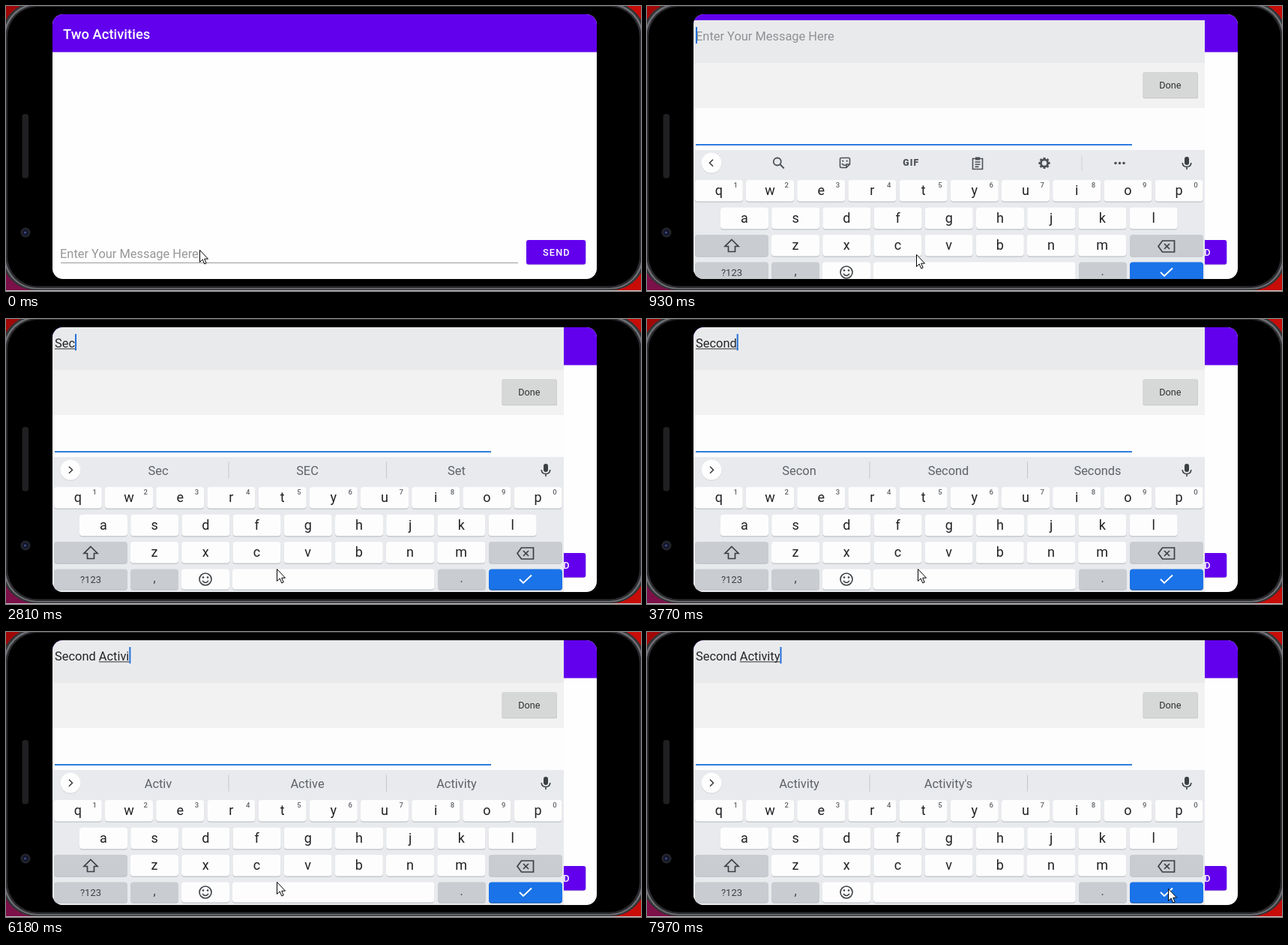
An HTML page with a canvas that plays this animation: 847 px wide and 380 px high, repeating every 8 s.

```html
<!DOCTYPE html>
<html lang="en">
<head>
<meta charset="utf-8">
<title>Typing a message</title>
<style>
html, body { margin: 0; width: 100%; height: 100%; overflow: hidden; background: #000; }
canvas { display: block; }
</style>
</head>
<body>
<canvas id="stage" width="847" height="380"></canvas>
<script>
const ctx = document.getElementById('stage').getContext('2d');
const LOOP = 8000, PURPLE = '#6200ee', BLUE = '#1a73e8', ICON = '#4d5156';
const WHITE = '#fdfdfd', GRAY_KEY = '#c9ccd1', BOARD = '#e8eaed';
const BODY = 16.42;

// time, x, y of the pointer tip
const pointer = [
  [0, 258, 325], [150, 261, 325], [280, 270, 326], [410, 288, 327], [540, 312, 328],
  [660, 336, 329], [800, 352, 330], [930, 359, 331], [1050, 361, 333],
  [7150, 372, 340], [7290, 420, 352], [7420, 490, 362], [7560, 570, 366],
  [7690, 640, 360], [7830, 685, 348], [7970, 695, 342]
];
// time, panel offset, panel opacity
const slide = [[0, 0, 0], [800, 20, 0.6], [930, 8, 1], [1050, 0, 1]];
// time, text, end of the underline, caret shown, suggestions
const typing = [
  [0, '', 0, 1, ''], [1180, '', 0, 0, ''], [1710, '', 0, 1, ''],
  [2140, 'S', 0, 1, ''], [2280, 'S', 1, 1, 'S|So|See'],
  [2420, 'Se', 2, 1, 'S|So|See'], [2560, 'Se', 2, 1, 'Se|See|Set'],
  [2680, 'Sec', 3, 1, 'Se|See|Set'], [2810, 'Sec', 3, 1, 'Sec|SEC|Set'],
  [3110, 'Seco', 4, 1, 'Sec|SEC|Set'], [3260, 'Seco', 4, 1, 'Seco|Second|Seconds'],
  [3400, 'Secon', 5, 1, 'Seco|Second|Seconds'], [3540, 'Secon', 5, 1, 'Secon|Second|Seconds'],
  [3720, 'Second', 6, 1, 'Secon|Second|Seconds'], [3860, 'Second', 6, 1, 'Second|Seconds|Secondary'],
  [4120, 'Second ', 0, 1, 'Second|Seconds|Secondary'], [4260, 'Second ', 0, 1, 'time|one|day'],
  [4630, 'Second ', 0, 0, 'time|one|day'], [4760, 'Second A', 0, 1, 'time|one|day'],
  [5020, 'Second A', 8, 1, 'A|And|At'], [5150, 'Second Ac', 9, 1, 'A|And|At'],
  [5300, 'Second Ac', 9, 1, 'Ac|Act|Account'], [5480, 'Second Act', 10, 1, 'Ac|Act|Account'],
  [5630, 'Second Act', 10, 1, 'Act|Acts|Action'], [5780, 'Second Acti', 11, 1, 'Act|Acts|Action'],
  [5920, 'Second Acti', 11, 1, 'Acti|Action|Active'], [6050, 'Second Activ', 12, 1, 'Acti|Action|Active'],
  [6180, 'Second Activi', 13, 1, 'Activ|Active|Activity'],
  [6320, 'Second Activi', 13, 1, 'Activi|Activity|Activities'],
  [6450, 'Second Activit', 14, 1, 'Activi|Activity|Activities'],
  [6580, 'Second Activit', 14, 1, 'Activit|Activity|Activities'],
  [6720, 'Second Activity', 14, 1, 'Activit|Activity|Activities'],
  [6870, 'Second Activity', 15, 1, "Activity|Activity's|"],
  [7290, 'Second Activity', 15, 0, "Activity|Activity's|"],
  [7830, 'Second Activity', 15, 1, "Activity|Activity's|"]
];

const at = (steps, t) => steps.filter(s => s[0] <= t).pop();

function rect(x, y, w, h, color) {
  ctx.fillStyle = color;
  ctx.fillRect(x, y, w, h);
}
function round(x, y, w, h, r, color) {
  ctx.fillStyle = color;
  ctx.beginPath();
  ctx.roundRect(x, y, w, h, r);
  ctx.fill();
}
function disc(x, y, r, color) {
  ctx.fillStyle = color;
  ctx.beginPath();
  ctx.arc(x, y, r, 0, 7);
  ctx.fill();
}
function text(str, x, y, size, color, align = 'left', weight = 400, spacing = 0) {
  ctx.font = `${weight} ${size}px Roboto, sans-serif`;
  ctx.letterSpacing = spacing + 'px';
  ctx.textAlign = align;
  ctx.fillStyle = color;
  ctx.fillText(str, x, y);
}
// stroke an SVG path around the point x, y
function line(x, y, d, color = ICON, width = 1.6) {
  ctx.save();
  ctx.translate(x, y);
  ctx.strokeStyle = color;
  ctx.lineWidth = width;
  ctx.stroke(new Path2D(d));
  ctx.restore();
}

function drawPhone() {
  rect(0, 0, 424, 190, '#a00808');
  rect(424, 0, 423, 380, '#c80c08');
  rect(0, 190, 424, 190, '#7c1048');
  // the rim runs slightly past the stage
  round(-6, -5, 859, 384, 46, '#333437');
  round(-3, -3, 853, 380.5, 44, '#707175');
  round(-0.5, -1, 848, 377, 42, '#2b2c2f');
  round(2, 1, 843, 372.5, 40, '#000');
  rect(0, 379, 847, 1, '#c8c8c8');
  round(21.5, 144, 8.5, 85.5, 3.5, '#202022');
  disc(26, 302, 6.5, '#25272e');
  disc(26, 302, 4.2, '#14172a');
  disc(25.5, 302, 1.6, '#3d4c86');
}

function drawApp() {
  rect(62, 11, 726, 353, '#fefefe');
  rect(62, 11, 726, 50.5, PURPLE);
  text('Two Activities', 76, 43.7, 18.42, '#fff', 'left', 500);
  text('Enter Your Message Here', 72, 335.5, BODY, '#979797');
  rect(73, 342, 610, 1, '#9a9a9a');
  round(694, 313.2, 79, 32, 3, '#c4bcd0');
  round(694, 312, 79.3, 32.4, 3, PURPLE);
  text('SEND', 716, 333, 12.7, '#fff', 'left', 500, 1.15);
}

function key(x, y, w, color = WHITE, h = 28.5) {
  round(x, y + 1.2, w, h, 4, color === BLUE ? '#1559b3' : '#bfc2c6');
  round(x, y, w, h, 4, color);
}
function letterRow(letters, x, y, hints) {
  [...letters].forEach((c, i) => {
    const left = x + 68.2 * i;
    key(left, y, 64);
    text(c, left + 32, y + 20, 18, '#202124', 'center');
    if (hints) text((i + 1) % 10, left + 54.3, y + 10.4, 9.5, '#5f6368', 'center', 500);
  });
}
function drawKeys() {
  letterRow('qwertyuiop', 63.8, 224, true);
  letterRow('asdfghjkl', 98, 260.7);
  letterRow('zxcvbnm', 166, 297);
  key(64, 297, 98, GRAY_KEY);
  line(113, 312, 'M0-8.5L9 .5H4.5V7.5H-4.5V.5H-9Z', '#3c4043', 1.7);
  key(644, 297, 98, GRAY_KEY);
  line(693, 312.5, 'M-11 0L-5.5-7.5H10.5V7.5H-5.5ZM-3-3.5L4 3.5M4-3.5L-3 3.5', '#3c4043', 1.7);

  const y = 333.5, h = 27;
  key(64, y, 98, GRAY_KEY, h);
  text('?123', 113, 352, 13, '#3c4043', 'center');
  key(166, y, 64, GRAY_KEY, h);
  text(',', 198, 351, 16, '#3c4043', 'center');
  key(234, y, 64, WHITE, h);
  line(266, 347, 'M-8 0a8 8 0 1 0 16 0a8 8 0 1 0-16 0M-4 2Q0 7 4 2', '#3c4043');
  disc(263, 344.5, 1.3, '#3c4043');
  disc(269, 344.5, 1.3, '#3c4043');
  key(302, y, 269.5, WHITE, h);
  key(576, y, 64, GRAY_KEY, h);
  text('.', 607.5, 351, 16, '#3c4043', 'center');
  key(644, y, 98, BLUE, h);
  line(693, 347, 'M-8 0L-3 5L8-5.5', '#fff', 1.9);
}

function drawTools() {
  line(173.8, 200, 'M-5-.5a5 5 0 1 0 10 0a5 5 0 1 0-10 0M3.5 3L9 8.5', ICON, 1.8);
  line(264, 201, 'M-5-6.5H5Q6.5-6.5 6.5-5V2L2 6.5H-5Q-6.5 6.5-6.5 5V-5Q-6.5-6.5-5-6.5M6.5 2H2V6.5M-4 1Q-2 4 1 3');
  disc(261.3, 198.7, 1.1, ICON);
  disc(266.7, 198.7, 1.1, ICON);
  text('GIF', 352.3, 205.3, 12.2, ICON, 'center', 900, 1.1);
  line(441, 202, 'M-6.5-6.5H6.5V7.5H-6.5ZM-3.5-2H3.5M-3.5 1.2H3.5M-3.5 4.4H1.5');
  rect(438, 193.5, 6, 4, ICON);
  line(530, 201.5, 'M-4.6 0a4.6 4.6 0 1 0 9.2 0a4.6 4.6 0 1 0-9.2 0', ICON, 2.8);
  for (let i = 0; i < 8; i++) {
    const a = i * Math.PI / 4, c = Math.cos(a), s = Math.sin(a);
    line(530, 201.5, `M${c * 5} ${s * 5}L${c * 7.6} ${s * 7.6}`, ICON, 3);
  }
  rect(579.5, 191.5, 1, 20, '#cfd1d4');
  [625, 630.5, 636].forEach(x => disc(x, 201.5, 1.8, ICON));
}

function drawSuggestions(words) {
  words.forEach((w, i) => text(w, 203 + 199 * i, 207.6, BODY, '#5f6368', 'center'));
  rect(296.5, 190.5, 1, 22, '#c4c7ca');
  rect(507, 190.5, 1, 22, '#c4c7ca');
}

function drawStrip(suggestions) {
  disc(86, 202.2, 13.6, '#d3d5d8');
  disc(86, 201.2, 13.4, '#fefefe');
  line(86, 201.3, suggestions ? 'M-2-4.5L2.5 0L-2 4.5' : 'M2-4.5L-2.5 0L2 4.5', '#3c4043');
  if (suggestions) drawSuggestions(suggestions.split('|'));
  else drawTools();
  round(717, 193, 6, 11, 3, '#3c4043');
  line(720, 201, 'M-5.8 0Q-5.5 5.5 0 5.5Q5.5 5.5 5.8 0M0 5.5V9', '#3c4043');
}

function drawEntry(str, underline, caret) {
  const x = 65, base = 37.6;
  if (str) text(str, x, base, BODY, '#242528');
  else text('Enter Your Message Here', x, base, BODY, '#909194');
  ctx.font = `400 ${BODY}px Roboto, sans-serif`;
  const width = n => ctx.measureText(str.slice(0, n)).width;
  const start = str.length > 7 ? 7 : 0;
  if (underline) rect(x + width(start), 39.3, width(underline) - width(start), 1, '#333');
  if (caret) rect(x + width(str.length), 20, 2, 22, '#2270d8');
}

function drawPanel(t) {
  const [, offset, alpha] = at(slide, t);
  if (!alpha) return;
  const [, str, underline, caret, suggestions] = at(typing, t);
  ctx.save();
  ctx.globalAlpha = alpha;
  ctx.translate(0, offset);
  rect(62, 11, 682, 57, '#e9eaec');
  rect(62, 68, 682, 60, '#f2f2f2');
  rect(62, 128, 682, 56, '#fdfdfd');
  rect(65, 176, 582, 2, '#2f7be0');
  rect(62, 184, 682, 180, BOARD);
  round(661.5, 81, 73.5, 34.2, 2, '#c3c4c4');
  round(661.5, 80, 73, 34.2, 2, '#d6d7d7');
  text('Done', 697.8, 102, 12.7, '#303030', 'center');
  drawEntry(str, underline, caret);
  drawStrip(suggestions);
  drawKeys();
  ctx.restore();
}

function drawPointer(t) {
  const [, x, y] = at(pointer, t);
  const arrow = new Path2D('M.5.5V16.5L4.2 13L6.8 19L9.2 18L6.7 12.2H11.5Z');
  ctx.save();
  ctx.translate(x, y);
  ctx.fillStyle = '#fff';
  ctx.fill(arrow);
  ctx.strokeStyle = '#000';
  ctx.lineWidth = 1;
  ctx.stroke(arrow);
  ctx.restore();
}

function frame(now) {
  const t = now % LOOP;
  drawPhone();
  ctx.save();
  ctx.beginPath();
  ctx.roundRect(62, 11, 726, 353, 14);
  ctx.clip();
  drawApp();
  drawPanel(t);
  ctx.restore();
  drawPointer(t);
  requestAnimationFrame(frame);
}
requestAnimationFrame(frame);
</script>
</body>
</html>
```
